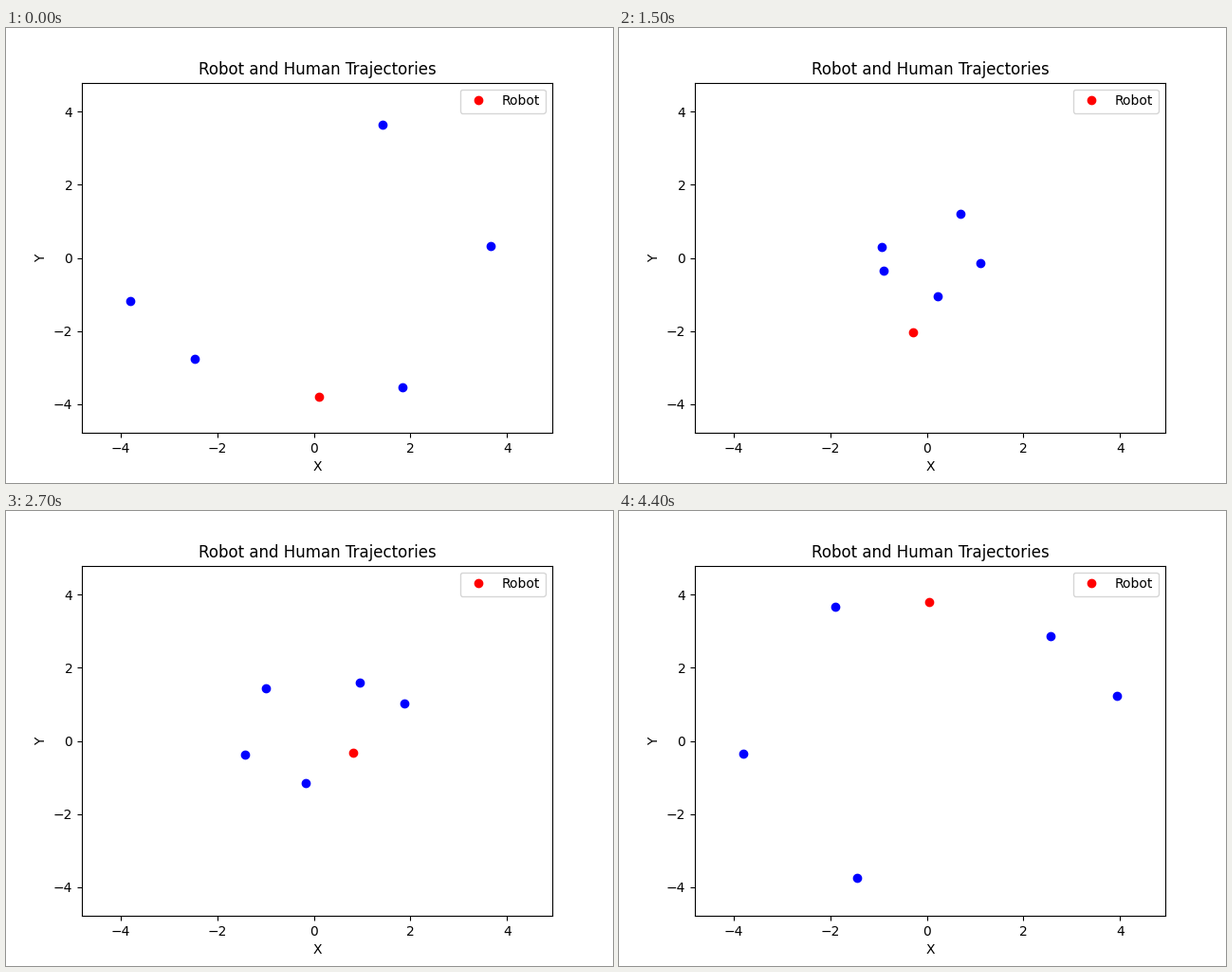
These frames come from a looping animation (640x480 px, 4.5 s). A matplotlib script:

```python
import numpy as np
import matplotlib.pyplot as plt
from matplotlib.animation import FuncAnimation

FRAMES, INTERVAL = 45, 100
STEP = 0.25      # time step; humans walk at unit speed
FREE = 23        # step at which every human can walk straight to the goal
LEAD = 0.175     # distance already covered at the first step

plt.rcParams["font.family"] = "DejaVu Sans"
fig, ax = plt.subplots(figsize=(6.4, 4.8), dpi=100)
ax.set(xlim=(-4.800, 4.936), ylim=(-4.7944, 4.8006), xlabel="X", ylabel="Y",
       title="Robot and Human Trajectories")


def human_track(goal, reach, swerve, delay):
    """Cross the circle to goal, swerving left near the middle.

    reach and swerve give the place at step FREE, along and left of the
    line through the centre; delay sets how late the swerve begins.
    """
    goal = np.array(goal)
    radius = np.hypot(*goal)
    ahead = goal / radius
    left = np.array([-ahead[1], ahead[0]])

    track = []
    for u in np.linspace(0, 1, FREE + 1):
        along = LEAD - radius + (reach + radius - LEAD) * u ** 1.1
        aside = swerve * np.sin(np.pi / 2 * u) ** delay
        track.append(along * ahead + aside * left)

    # unit speed, easing out within the last unit
    while len(track) < FRAMES:
        gap = goal - track[-1]
        track.append(track[-1] + STEP * gap / max(1, np.hypot(*gap)))
    return np.array(track)


def spline(times, pts):
    """Smooth cubic curve through pts at the given times."""
    slopes = np.gradient(pts, times, axis=0)

    def at(t):
        i = np.clip(np.searchsorted(times, t, "right") - 1, 0, len(times) - 2)
        h = times[i + 1] - times[i]
        u = (t - times[i]) / h
        return ((1 + 2 * u) * (1 - u) ** 2 * pts[i]
                + u * (1 - u) ** 2 * h * slopes[i]
                + u * u * (3 - 2 * u) * pts[i + 1]
                + u * u * (u - 1) * h * slopes[i + 1])
    return at


humans = [
    human_track((-1.477, -3.813), reach=0.13, swerve=0.35, delay=3),
    human_track((-3.838, -0.350), reach=0.45, swerve=0.34, delay=2),
    human_track((3.970, 1.236), reach=1.12, swerve=0.62, delay=0.5),
    human_track((2.580, 2.887), reach=0.84, swerve=0.52, delay=1.1),
    human_track((-1.911, 3.710), reach=0.74, swerve=0.32, delay=0.8),
]

# the robot waits at the side, rounds the crowd, then heads up
robot_path = spline(
    np.array([0, 6, 12, 15, 23, 27, 36, 44], float),
    np.array([(0.11, -3.80), (-0.66, -3.05), (-0.54, -2.22), (-0.29, -2.04),
              (0.64, -1.21), (0.81, -0.32), (0.64, 1.91), (0.05, 3.80)]))

robot_dot, = ax.plot([], [], "ro", label="Robot")
human_dots, = ax.plot([], [], "bo")
ax.legend(loc="upper right")


def update(n):
    x, y = robot_path(n)
    robot_dot.set_data([x], [y])
    human_dots.set_data(*np.array([track[n] for track in humans]).T)
    return robot_dot, human_dots


anim = FuncAnimation(fig, update, frames=FRAMES, interval=INTERVAL,
                     repeat=True, repeat_delay=0)
plt.show()
```
